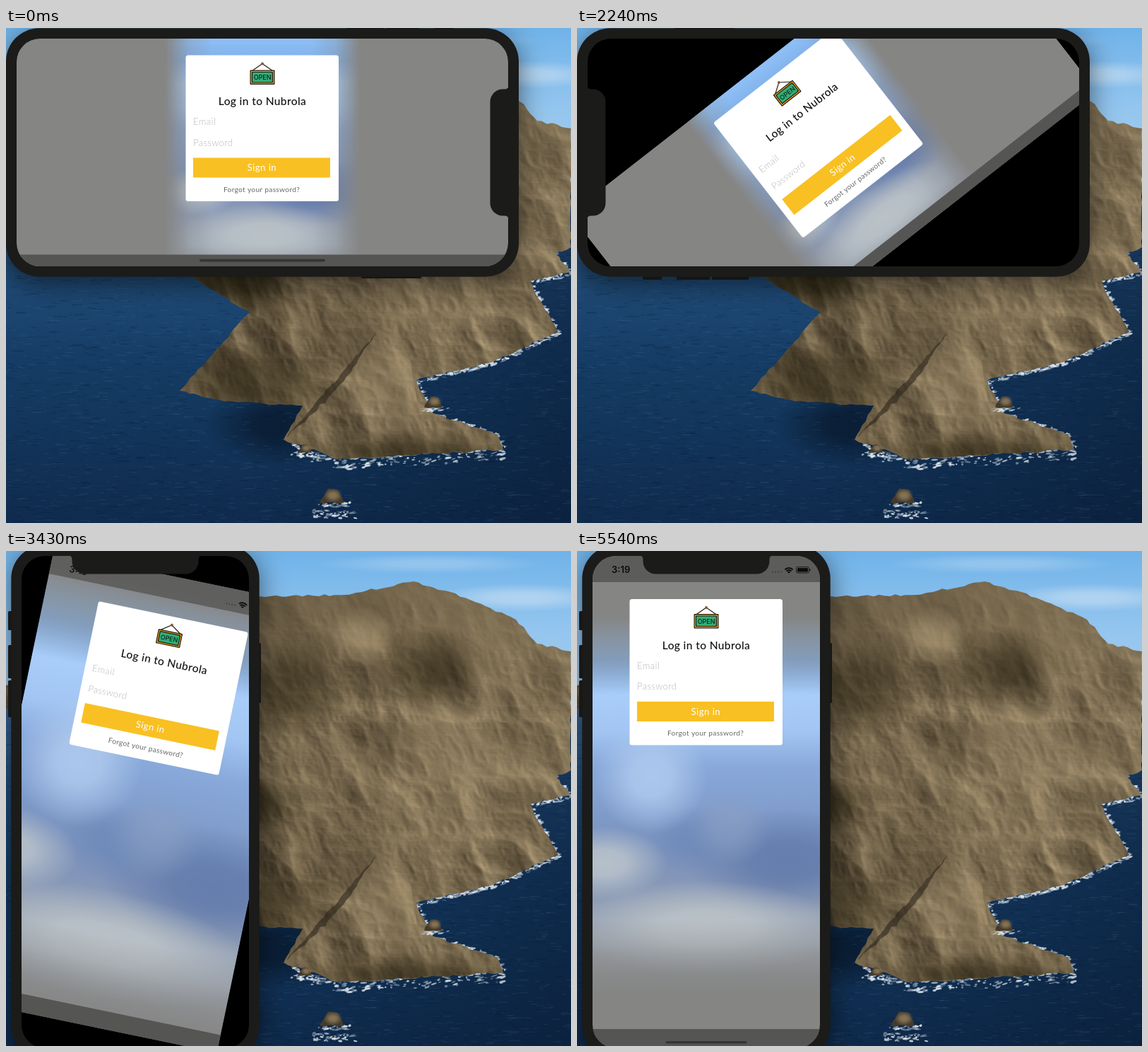
Animation of 800 by 700 pixels, one loop 5.64 s. Source, as an HTML page with a canvas:

```html
<!DOCTYPE html>
<html lang="en">
<head>
<meta charset="utf-8">
<title>Rotating login form</title>
<style>
html, body { margin: 0; width: 800px; height: 700px; overflow: hidden; background: #123258; }
canvas { display: block; }
</style>
</head>
<body>
<canvas id="stage" width="800" height="700"></canvas>
<script>
const LOOP = 5640, TICK = 150, W = 800, H = 700, LONG = 696, SHORT = 322;
const ctx = document.getElementById('stage').getContext('2d');
const mix = (a, b, p) => a + (b - a) * p;
const clamp = v => Math.max(0, Math.min(1, v));
const rad = d => d * Math.PI / 180;
const ease = u => (1 - Math.cos(Math.PI * clamp(u))) / 2;

let seed = 7;
function rnd() {
  seed = (seed * 1664525 + 1013904223) >>> 0;
  return seed / 4294967296;
}
const span = (a, b) => mix(a, b, rnd());

function layer(w, h) {
  const c = document.createElement('canvas');
  c.width = w;
  c.height = h;
  return c;
}

// Evenly spaced colors along a line.
function gradient(c, x0, y0, x1, y1, colors) {
  const g = c.createLinearGradient(x0, y0, x1, y1);
  colors.forEach((color, i) => g.addColorStop(i / (colors.length - 1), color));
  return g;
}

// Soft ellipse; rgb is "r,g,b".
function glow(c, x, y, rx, ry, rgb, a) {
  c.save();
  c.translate(x, y);
  c.scale(rx, ry);
  const g = c.createRadialGradient(0, 0, 0, 0, 0, 1);
  [[0, 1], [.35, .9], [.7, .4], [1, 0]].forEach(([at, k]) => g.addColorStop(at, `rgba(${rgb},${a * k})`));
  c.fillStyle = g;
  c.fillRect(-1, -1, 2, 2);
  c.restore();
}

// ---------- landscape ----------

const points = text => text.split(' ').map(p => p.split(',').map(Number));

const coast = points('0,190 360,64 480,62 577,43 650,66 722,97 752,131 800,142 800,310 778,320 ' +
  '800,345 742,358 782,430 690,472 581,498 605,545 695,574 704,596 470,610 393,582 420,534 ' +
  '310,528 246,513 345,402 262,352 0,222');
const rock = points('525,430 572,470 582,530 695,574 704,596 470,610 393,582');

function jagged(pts, jag) {
  const path = new Path2D();
  pts.forEach(([x, y], i) => {
    const [nx, ny] = pts[(i + 1) % pts.length];
    const n = Math.ceil(Math.hypot(nx - x, ny - y) / 8);
    for (let k = 0; k < n; k++) {
      const j = k ? jag : 0;
      path.lineTo(mix(x, nx, k / n) + span(-j, j), mix(y, ny, k / n) + span(-j, j));
    }
  });
  path.closePath();
  return path;
}

function hash(x, y) {
  let h = Math.imul(x, 374761393) ^ Math.imul(y, 668265263);
  h = Math.imul(h ^ (h >>> 13), 1274126177);
  return ((h ^ (h >>> 16)) >>> 0) / 4294967296;
}
function noise(x, y) {
  const i = Math.floor(x), j = Math.floor(y);
  const u = x - i, v = y - j, su = u * u * (3 - 2 * u), sv = v * v * (3 - 2 * v);
  return mix(mix(hash(i, j), hash(i + 1, j), su), mix(hash(i, j + 1), hash(i + 1, j + 1), su), sv);
}
// Ridged height, with gullies leaning down to the right.
function height(x, y) {
  let sum = 0, size = 70, amp = .5;
  for (let o = 0; o < 5; o++) {
    sum += amp * (1 - Math.abs(2 * noise((x - y * .35) / size, y / (size * 1.3)) - 1));
    size /= 2.1;
    amp /= 2;
  }
  return sum;
}

// Rock relief lit from the right.
function makeLand() {
  const cv = layer(W, H), c = cv.getContext('2d');
  const img = c.createImageData(W, H), dark = [42, 34, 22], lit = [198, 176, 135];
  for (let y = 40; y < 620; y++) {
    for (let x = 0; x < W; x++) {
      const h = height(x, y), slope = h - height(x + 4, y - 2);
      const rough = .25 + .75 * clamp((y - 50) / 170);
      const v = clamp(.46 + .07 * (x - 500) / 300 + rough * (slope * 1.1 + (h - .62) * .45));
      const at = (y * W + x) * 4;
      dark.forEach((d, k) => { img.data[at + k] = mix(d, lit[k], v); });
      img.data[at + 3] = 255;
    }
  }
  c.putImageData(img, 0, 0);
  const shade = '38,32,14', sun = '205,182,140';
  glow(c, 395, 195, 90, 75, shade, .5);
  glow(c, 600, 165, 85, 60, shade, .45);
  glow(c, 320, 360, 110, 45, shade, .7);
  glow(c, 350, 500, 130, 60, shade, .5);
  glow(c, 505, 120, 50, 45, sun, .35);
  glow(c, 640, 300, 170, 110, sun, .2);
  c.save();
  c.clip(jagged(rock, 1));
  glow(c, 545, 500, 90, 80, sun, .3);
  glow(c, 570, 605, 190, 40, shade, .5);
  c.fillStyle = 'rgba(44,38,28,.6)';
  c.fill(jagged(points('525,430 478,500 435,545 393,582'), 2));
  c.restore();
  c.globalCompositeOperation = 'destination-in';
  c.fill(jagged(coast, 1.6));
  return cv;
}

function foam(c, [x0, y0], [x1, y1], spread) {
  for (let i = Math.hypot(x1 - x0, y1 - y0) * .7; i > 0; i--) {
    const p = rnd();
    c.fillStyle = `rgba(228,236,242,${span(.2, .85)})`;
    c.beginPath();
    c.ellipse(mix(x0, x1, p) + span(-3, 3), mix(y0, y1, p) + span(-.3, 1) * spread,
      span(1, 5), span(.5, 1.8), span(-.4, .2), 0, 7);
    c.fill();
  }
}

function makeWallpaper() {
  const cv = layer(W, H), c = cv.getContext('2d');
  c.fillStyle = gradient(c, 0, 0, 0, 222, ['#70b3e9', '#93c5ee', '#aacfeb']);
  c.fillRect(0, 0, W, 222);
  glow(c, 730, 66, 130, 20, '205,225,243', .6);
  glow(c, 600, 18, 160, 14, '205,225,243', .35);

  c.fillStyle = gradient(c, 0, 222, 0, H, ['#3a6796', '#214c78', '#163d66', '#123459', '#0f2b4d']);
  c.fillRect(0, 222, W, H);
  c.fillStyle = gradient(c, 330, 0, 800, 0, ['rgba(8,24,48,0)', 'rgba(8,24,48,.5)']);
  c.fillRect(330, 222, W, H);
  glow(c, 390, 560, 110, 60, '6,18,34', .65);
  for (let i = 0; i < 3600; i++) {
    c.fillStyle = rnd() < .55 ? 'rgba(6,24,48,.22)' : 'rgba(90,135,175,.13)';
    c.fillRect(span(-10, W), span(240, H), span(3, 16), span(.7, 1.6));
  }

  const first = 9, last = 18;
  for (let i = first; i < last; i++) foam(c, coast[i], coast[i + 1], i < last - 1 ? 5 : 15);
  foam(c, [405, 592], [470, 612], 12);
  foam(c, [432, 684], [492, 686], 9);
  c.drawImage(makeLand(), 0, 0);
  [[423, 596, 10], [461, 663, 17], [605, 530, 13]].forEach(([x, y, r]) => {
    foam(c, [x - r, y + r * .6], [x + r * 1.5, y + r * .5], 5);
    c.fillStyle = '#453a2a';
    c.fill(jagged([[x - r, y + r * .5], [x - r * .3, y - r * .7], [x + r * .5, y - r * .6], [x + r, y + r * .5]], 1.5));
    glow(c, x + 2, y - 2, r * .8, r * .6, '160,140,105', .7);
  });
  return cv;
}

// ---------- blurred picture behind the form ----------

function makeBackdrop(portrait) {
  const w = 440, h = 540, cv = layer(w, h), c = cv.getContext('2d');
  c.translate(w / 2, h / 2);
  c.fillStyle = gradient(c, 0, -250, 0, 250, ['#8fc1f7', '#82b0ea', '#a9cdf8', '#a2c5f3', '#88a9da',
    '#829fcf', '#7b94c0', '#8295b9', '#939fb4', '#9fa8b4', '#929499']);
  c.fillRect(-w / 2, -h / 2, w, h);
  glow(c, 115, 85, 140, 75, '95,120,170', .8);
  glow(c, -15, 55, 70, 50, '104,132,182', .6);
  glow(c, 32, 35, 60, 55, '140,160,196', .6);
  glow(c, -78, -35, 80, 80, '176,202,238', .9);
  glow(c, -145, 86, 90, 52, '182,192,202', 1);
  glow(c, 0, 179, 190, 68, '186,194,200', 1);
  c.globalCompositeOperation = 'destination-in';
  c.fillStyle = portrait
    ? gradient(c, 0, -262, 0, 274, ['#0000', '#0007', '#000', '#000', '#000', '#000', '#000', '#000', '#000', '#0008', '#0000'])
    : gradient(c, -212, 0, 212, 0, ['#0000', '#000b', '#000', '#000', '#000', '#000', '#000', '#000b', '#0000']);
  c.fillRect(-w / 2, -h / 2, w, h);
  return cv;
}

const wallpaper = makeWallpaper();
const wide = makeBackdrop(false), tall = makeBackdrop(true);

// ---------- app ----------

function box(x, y, w, h, r, color) {
  ctx.fillStyle = color;
  ctx.beginPath();
  ctx.roundRect(x, y, w, h, r);
  ctx.fill();
}
function label(text, x, y, font, color, spacing = 0, align = 'left') {
  ctx.font = font;
  ctx.fillStyle = color;
  ctx.letterSpacing = spacing + 'px';
  ctx.textAlign = align;
  ctx.fillText(text, x, y);
}
const lato = (weight, size) => `${weight} ${size}px Lato, "Open Sans", sans-serif`;

function drawSign() {
  ctx.strokeStyle = '#2a2118';
  ctx.lineWidth = 1.2;
  ctx.beginPath();
  ctx.moveTo(94, 22);
  ctx.lineTo(108.5, 12);
  ctx.lineTo(123, 22);
  ctx.stroke();
  box(106.5, 10, 4, 4, 2, '#8a5a2c');
  ['#221c12', '#f0a31c', '#221c12', '#30ae78'].forEach((color, i) =>
    box(91 + i * 1.2, 21 + i * 1.2, 35 - i * 2.4, 20.5 - i * 2.4, 1, color));
  label('OPEN', 108.6, 34.6, '500 9px Inter, sans-serif', '#10241b', 0, 'center');
}

function drawCard() {
  box(0, 0, 216.5, 206.5, 3.5, '#fff');
  drawSign();
  label('Log in to Nubrola', 108.5, 70.5, lato(500, 15.5), '#111', .4, 'center');
  label('Email', 10.5, 98.5, lato(300, 13.2), '#b9b9bc', .4);
  label('Password', 10.5, 128, lato(300, 13.2), '#b9b9bc', .3);
  box(10.5, 145, 194, 28, 0, '#f8c022');
  label('Sign in', 107.8, 163.8, lato(400, 13.2), '#fff', .45, 'center');
  label('Forgot your password?', 107.5, 193, lato(400, 10.2), '#68686a', .3, 'center');
}

function drawStatus() {
  label('3:19', 27, 24, '600 13px Inter, sans-serif', '#0c0c0c');
  for (let i = 0; i < 4; i++) box(254 + i * 4, 21.5, 2, 2, 1, '#3c3c3c');
  ctx.strokeStyle = '#0c0c0c';
  ctx.lineWidth = 2;
  for (let r = 2; r < 9; r += 3) {
    ctx.beginPath();
    ctx.arc(278, 25, r, rad(-135), rad(-45));
    ctx.stroke();
  }
  ctx.lineWidth = .8;
  ctx.beginPath();
  ctx.roundRect(288.5, 15.5, 18, 8.5, 2.2);
  ctx.stroke();
  box(290, 17, 15, 5.5, 1, '#0c0c0c');
  box(307.3, 18.2, 1.2, 3, 1, '#0c0c0c');
}

// p runs from 0 (landscape layout) to 1 (portrait layout).
function drawApp(p, home) {
  const w = mix(LONG, SHORT, p), h = mix(SHORT, LONG, p);
  const s = Math.min(w / SHORT, h / 494), q = clamp(p * 2.7);
  ctx.save();
  ctx.beginPath();
  ctx.rect(-w / 2, -h / 2, w, h);
  ctx.clip();
  ctx.fillStyle = '#858584';
  ctx.fillRect(-w / 2, -h / 2, w, h);
  [[wide, 1 - q], [tall, q]].forEach(([img, a]) => {
    ctx.globalAlpha = a;
    ctx.drawImage(img, -220 * s, -270 * s, 440 * s, 540 * s);
  });
  ctx.globalAlpha = 1;
  const bar = mix(16.5, 27, p);
  ctx.fillStyle = '#555554';
  ctx.fillRect(-w / 2, h / 2 - bar, w, bar);
  if (p) {
    ctx.save();
    ctx.globalAlpha = .35 + p * .65;
    ctx.fillStyle = '#5c5c5b';
    ctx.fillRect(-w / 2, -h / 2, w, 37 * p);
    ctx.translate(-w / 2, -h / 2);
    drawStatus();
    ctx.restore();
  }
  if (home) {
    const len = mix(178, 115, p);
    box(-len / 2, mix(150.8, 338, p), len, 3.6, 1.8, '#353535');
  }
  ctx.translate(-108.5, -h / 2 + mix(23.5, 61, p));
  drawCard();
  ctx.restore();
}

// ---------- phone ----------

function drawBody() {
  [[-180, -270, 27], [-180, -222, 47], [-180, -172, 52], [172, -225, 85]].forEach(([x, y, len]) =>
    box(x, y, 6, len, 1.5, '#20211f'));
  ctx.save();
  ctx.shadowColor = 'rgba(0,0,0,.55)';
  ctx.shadowBlur = 38;
  ctx.shadowOffsetY = 9;
  box(-175.7, -363, 351.4, 726, 47, '#1b1b19');
  ctx.restore();
}

function drawNotch() {
  const top = -LONG / 2 - 1, low = top + 26.5, a = 89.5;
  ctx.fillStyle = '#1b1b19';
  ctx.beginPath();
  ctx.moveTo(-a - 5, top);
  ctx.quadraticCurveTo(-a, top + 1, -a, top + 6);
  ctx.arcTo(-a, low, 0, low, 18);
  ctx.arcTo(a, low, a, top + 6, 18);
  ctx.lineTo(a, top + 6);
  ctx.quadraticCurveTo(a, top + 1, a + 5, top);
  ctx.fill();
}

function drawPhone(device, content, p, home) {
  ctx.save();
  if (device % 180) ctx.translate(363, 176);
  else ctx.translate(183, 355);
  ctx.save();
  ctx.rotate(rad(device));
  drawBody();
  box(-SHORT / 2, -LONG / 2, SHORT, LONG, 33, '#000');
  ctx.clip();
  ctx.rotate(rad(content - device));
  drawApp(p, home);
  ctx.restore();
  ctx.rotate(rad(device));
  drawNotch();
  ctx.restore();
}

const arrow = new Path2D('M.6 1V14.6L3.7 11.8L6 17L8.3 16L6.1 11L10.3 10.8Z');
const trail = points('716,63 788,429 779,448 783,525 770,653 771,660');

function drawCursor([x, y]) {
  ctx.save();
  ctx.translate(x, y);
  ctx.fillStyle = '#000';
  ctx.strokeStyle = '#fff';
  ctx.lineWidth = 1.1;
  ctx.fill(arrow);
  ctx.stroke(arrow);
  ctx.restore();
}

const snap = (t, base) => base + Math.floor((t - base) / TICK) * TICK;

function draw(now) {
  const t = now % LOOP;
  ctx.drawImage(wallpaper, 0, 0);
  if (t < 900) drawPhone(90, 0, 0, true);
  else if (t < 1940) drawPhone(180, 90, 0, true);
  else if (t < 3290) {
    const turn = ease((snap(t, 1940) - 1850) / 560);
    drawPhone(270, 180 + 180 * turn, 0, t >= 2840);
  } else {
    const at = snap(t, 3720), p = ease((at - 3114) / 400);
    drawPhone(0, 90 * (1 - p), p, at >= 3870);
    const spot = trail[(at - 3720) / TICK];
    if (spot) drawCursor(spot);
  }
}

const start = performance.now();
function tick() {
  draw(performance.now() - start);
  requestAnimationFrame(tick);
}
tick();
</script>
</body>
</html>
```
